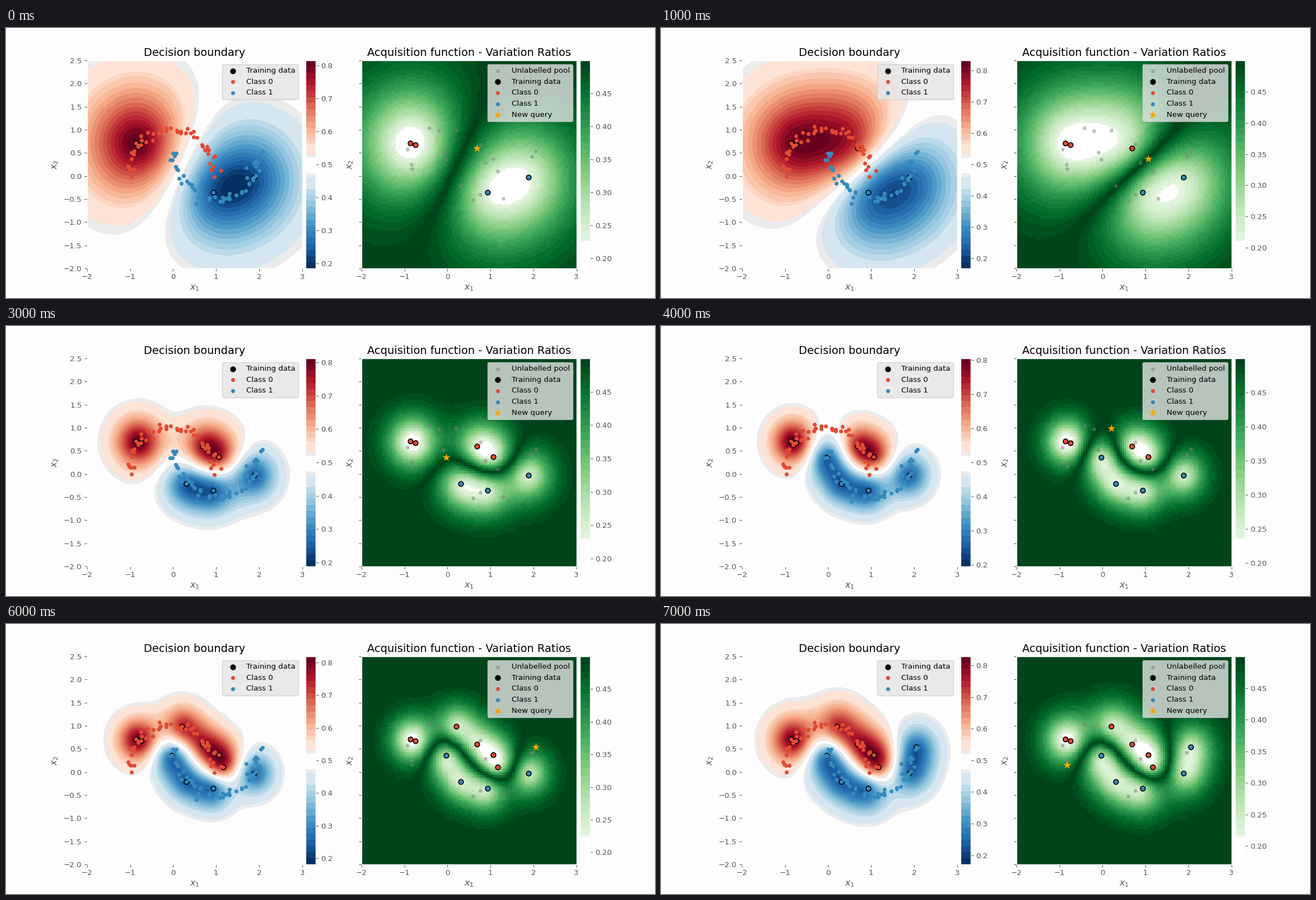
Write a matplotlib script that moves like this. It is 1159 px wide and 483 px high and loops after 8000 ms.

```python
import numpy as np
import matplotlib.pyplot as plt
from matplotlib.animation import FuncAnimation
from matplotlib.colors import ListedColormap, to_rgba

W, H, DPI = 1159, 483, 96
EXTENT = (-2, 3, -2, 2.5)
FINE, COARSE = (140, 126), (100, 100)
SEED, STEPS = 4, 8
INK, RED, BLUE, PAPER = "#555555", "#E24A33", "#348ABD", "#fdfdfd"

plt.rcParams.update({
    "font.family": "DejaVu Sans", "font.size": 10.06,
    "axes.edgecolor": "white", "axes.linewidth": 1, "axes.labelcolor": INK,
    "axes.labelsize": 12, "axes.titlesize": 14.5, "axes.facecolor": "#E5E5E5",
    "xtick.color": INK, "ytick.color": INK, "figure.facecolor": PAPER,
})

# Labelled points in the order they are acquired; the first four are the seed set.
POINTS = np.array([
    (-.867, .71), (-.75, .667), (.936, -.352), (1.88, -.024),
    (.682, .595), (1.06, .373), (.305, -.21), (-.033, .352),
    (.203, .983), (1.165, .103), (2.055, .54), (-.828, .15)])
LABELS = np.array([1, 1, -1, -1, 1, 1, -1, -1, 1, 1, -1, 1])

# Pool points that are never queried.
POOL = np.array([
    (-.42, 1.04), (-.2, .98), (-.93, .57), (-.84, .25), (-.09, .52), (.77, .68),
    (.88, .28), (1.96, .42), (.77, -.4), (.6, -.52), (1.3, -.49)])


def two_moons(n, noise):
    rng = np.random.default_rng(4)
    t = np.linspace(0, np.pi, n)
    upper = np.column_stack([np.cos(t), np.sin(t)])
    lower = np.column_stack([1 - np.cos(t), .5 - np.sin(t)])
    return [moon + rng.normal(0, noise, (n, 2)) for moon in (upper, lower)]


MOONS = two_moons(50, .07)


# Gaussian process classifier, Laplace approximation

def sigmoid(z):
    return 1 / (1 + np.exp(-z))


def kernel(a, b, amp, ell):
    d2 = ((a[:, None] - b[None]) ** 2).sum(-1)
    return amp * np.exp(-d2 / (2 * ell ** 2))


def laplace(x, y, amp, ell):
    """Mode of the posterior: gradient, root weights, Cholesky and evidence."""
    k = kernel(x, x, amp, ell)
    t = (y + 1) / 2
    f = np.zeros(len(x))
    for _ in range(25):
        pi = sigmoid(f)
        w = pi * (1 - pi)
        sw = np.sqrt(w)
        b_mat = np.eye(len(x)) + sw[:, None] * k * sw
        b = w * f + t - pi
        a = b - sw * np.linalg.solve(b_mat, sw * (k @ b))
        f = k @ a
    chol = np.linalg.cholesky(b_mat)
    evidence = (-a @ f / 2 - np.log1p(np.exp(-y * f)).sum()
                - np.log(np.diag(chol)).sum())
    return t - sigmoid(f), sw, chol, evidence


MOVES = [np.array((i, j)) for i in (-1, 0, 1) for j in (-1, 0, 1) if i or j]


def fit(x, y, ell):
    """Climb the evidence in log amplitude and log length scale."""
    best = np.log([12, ell])
    low, high = np.log([3, ell * .6]), np.log([60, ell * 1.6])
    score = laplace(x, y, *np.exp(best))[3]
    step = .1
    while step > .003:
        moved = False
        for move in MOVES:
            trial = np.clip(best + step * move, low, high)
            value = laplace(x, y, *np.exp(trial))[3]
            if value > score + 1e-9:
                best, score, moved = trial, value, True
        if not moved:
            step /= 2
    return np.exp(best)


NODES, WEIGHTS = np.polynomial.hermite_e.hermegauss(24)
WEIGHTS = WEIGHTS / WEIGHTS.sum()


def predict(x, y, amp, ell, grid):
    grad, sw, chol, _ = laplace(x, y, amp, ell)
    ks = kernel(x, grid, amp, ell)
    mean = grad @ ks
    v = np.linalg.solve(chol, sw[:, None] * ks)
    sd = np.sqrt(np.maximum(amp - (v ** 2).sum(0), 1e-9))
    return sum(w * sigmoid(mean + sd * n) for n, w in zip(NODES, WEIGHTS))


def cell_centres(nx, ny):
    x0, x1, y0, y1 = EXTENT
    gx = x0 + (np.arange(nx) + .5) * (x1 - x0) / nx
    gy = y0 + (np.arange(ny) + .5) * (y1 - y0) / ny
    return np.column_stack([g.ravel() for g in np.meshgrid(gx, gy)])


def solve_step(k):
    """Class probability and variation ratio after k queries."""
    x, y = POINTS[:SEED + k], LABELS[:SEED + k]
    amp, ell = fit(x, y, 1.05 if k < 2 else .44)
    prob, rough = (predict(x, y, amp, ell, cell_centres(*n)).reshape(n[::-1])
                   for n in (FINE, COARSE))
    return prob, np.minimum(rough, 1 - rough)


RESULTS = [solve_step(k) for k in range(STEPS)]


# Drawing

def banded(name, bands, overrides):
    """A colormap in flat bands, with some ranges given one colour."""
    x = (np.arange(512) + .5) / 512
    colors = plt.get_cmap(name)(np.floor(x * bands) / (bands - 1))
    for lo, hi, c in overrides:
        colors[(x >= lo) & (x < hi)] = to_rgba(c)
    return ListedColormap(colors)


DIVERGING = banded("RdBu_r", 34, [
    (.38, .44, "#d5e6f0"), (.44, .458, "#ebebeb"), (.458, .531, PAPER),
    (.531, .547, "#ebebeb"), (.547, .60, "#fde3d6")])
GREENS = banded("Greens", 28, [(0, .13, "white")])

fig = plt.figure(figsize=(W / DPI, H / DPI), dpi=DPI)


def add_box(x0, x1):
    return fig.add_axes([x0 / W, .11, (x1 - x0) / W, .77])


def panel(x0, x1, title, cmap, shape, interpolation):
    ax = add_box(x0, x1)
    ax.set_title(title)
    ax.set_xlabel("$x_1$")
    image = ax.imshow(np.zeros(shape[::-1]), cmap=cmap, extent=EXTENT,
                      origin="lower", aspect="auto", zorder=0,
                      interpolation=interpolation)
    ax.set(xlim=EXTENT[:2], ylim=EXTENT[2:], xticks=range(-2, 4),
           yticks=np.arange(-2, 2.6, .5))
    return ax, image


def color_bar(x0, x1, cmap):
    ax = add_box(x0, x1)
    ramp = ax.imshow(np.linspace(0, 1, 742)[:, None], cmap=cmap, aspect="auto",
                     origin="lower", interpolation="nearest", vmin=0, vmax=1)
    ax.set_xticks([])
    ax.yaxis.tick_right()
    return ax, ramp


def show_map(image, bar, values, lo, hi, ticks, fmt):
    image.set_data(values)
    image.set_clim(lo, hi)
    ax, ramp = bar
    ramp.set_extent((0, 1, lo, hi))
    ax.set_ylim(lo, hi)
    ticks = [t for t in ticks if lo <= t <= hi]
    ax.set_yticks(ticks, [fmt % t for t in ticks])


def dots(ax, label, color, size, **kw):
    return ax.scatter([0], [0], s=size, c=color, linewidths=0, label=label, **kw)


def labelled_dots(ax):
    return (dots(ax, "Training data", "black", 60),
            [dots(ax, "Class 0", RED, 28), dots(ax, "Class 1", BLUE, 28)])


left, left_map = panel(144.9, 528.8, "Decision boundary", DIVERGING, FINE, "bilinear")
right, right_map = panel(634.8, 1018.7, "Acquisition function - Variation Ratios",
                         GREENS, COARSE, "nearest")
right.tick_params(labelleft=False)
for label_x in (88, 615):
    fig.text(label_x / W, 1 - 244.5 / H, "$x_2$", rotation=90, size=12, color=INK,
             ha="center", va="center")
left_bar = color_bar(534.5, 553.1, DIVERGING)
right_bar = color_bar(1024.5, 1043.1, GREENS)

left_train, left_classes = labelled_dots(left)
pool = dots(right, "Unlabelled pool", "gray", 26, alpha=.5)
right_train, right_classes = labelled_dots(right)
query = dots(right, "New query", "orange", 125, marker="*")
for ax in (left, right):
    ax.legend(loc="upper right")


def draw(k):
    n = SEED + k
    prob, ratio = RESULTS[k]
    peak = .5 + np.abs(prob - .5).max()
    show_map(left_map, left_bar, prob, 1 - peak, peak, np.arange(2, 9) / 10, "%.1f")
    show_map(right_map, right_bar, ratio, 1 - peak, ratio.max(),
             np.arange(4, 10) / 20, "%.2f")

    known, labels = POINTS[:n], LABELS[:n]
    left_train.set_offsets(known)
    right_train.set_offsets(known)
    for i, sign in enumerate((1, -1)):
        own = known[labels == sign]
        left_classes[i].set_offsets(np.vstack([MOONS[i], own]))
        right_classes[i].set_offsets(own)
    pool.set_offsets(np.vstack([POOL, POINTS[n + 1:]]))
    query.set_offsets(POINTS[n:n + 1])
    return []


anim = FuncAnimation(fig, draw, frames=STEPS, interval=1000, repeat=True)
plt.show()
```
